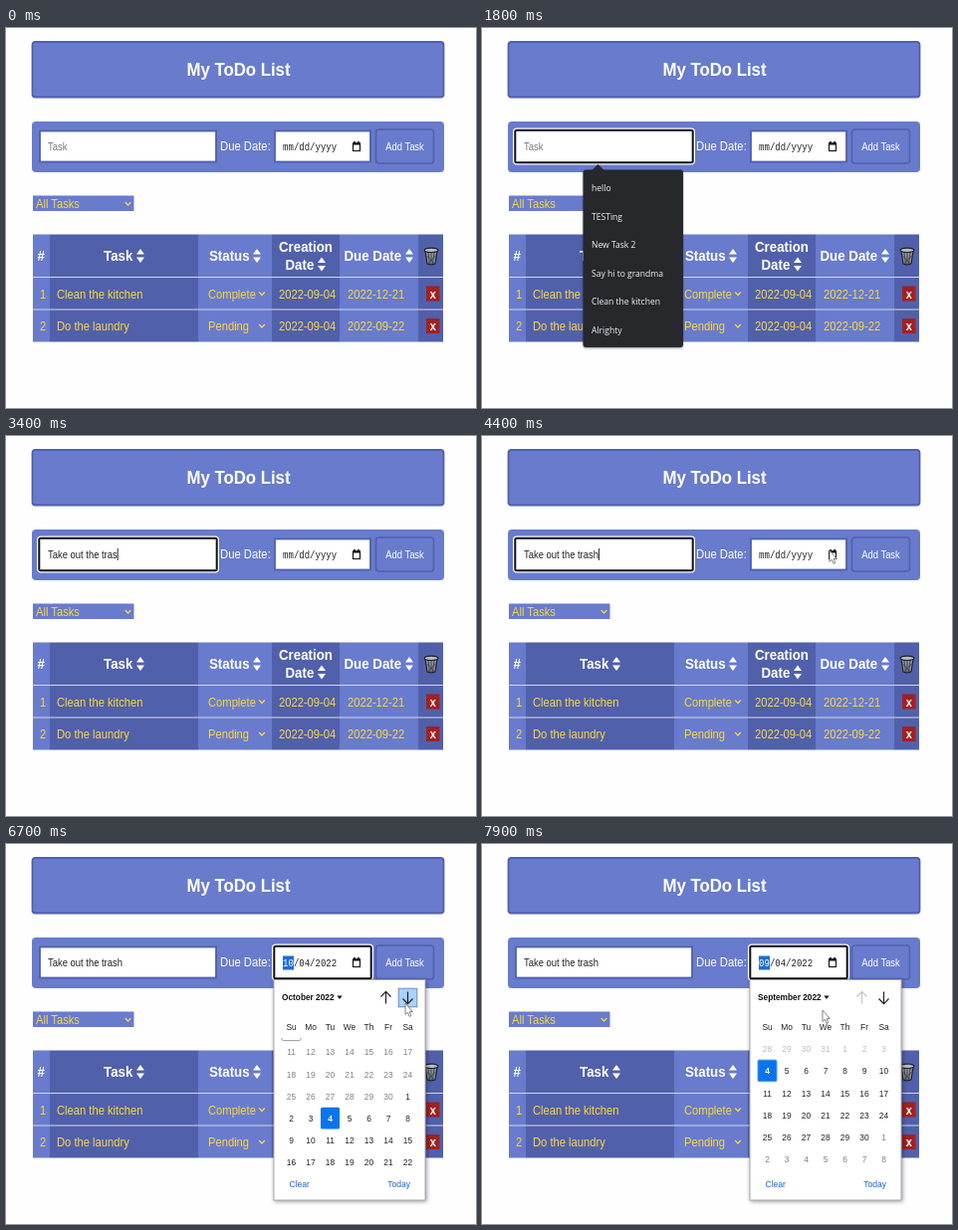
These frames come from a looping animation (472x382 px, 8 s). An HTML page:

```html
<!DOCTYPE html>
<html lang="en">
<head>
<meta charset="utf-8">
<title>My ToDo List</title>
<style>
  html, body { margin: 0; width: 100%; height: 100%; overflow: hidden; background: #fefdff; }
  svg { display: block; }
</style>
</head>
<body>
<svg id="stage" width="472" height="382" viewBox="0 0 472 382"></svg>
<script>
const LOOP = 8000, TICK = 100;
const SQUEEZE = 0.875;
const LIGHT = '#687bcd', DARK = '#5160ab', GOLD = '#fdd63c', INK = '#222', BLUE = '#0b74ec';
const SANS = '"Liberation Sans", Arial, sans-serif';
const MONO = '"Liberation Mono", monospace';
const UI = '"Open Sans", "Noto Sans", sans-serif';
const stage = document.getElementById('stage');

function el(parent, tag, attrs = {}) {
  const node = document.createElementNS('http://www.w3.org/2000/svg', tag);
  for (const key in attrs) node.setAttribute(key, attrs[key]);
  return parent.appendChild(node);
}
const group = (parent, attrs) => el(parent, 'g', attrs);
const rect = (parent, x, y, width, height, fill, more) =>
  el(parent, 'rect', { x, y, width, height, fill, ...more });
const path = (parent, d, stroke, more) =>
  el(parent, 'path', { d, stroke, fill: 'none', 'stroke-width': 1.2, ...more });

// y is the middle of the capitals
function text(parent, x, y, str, size, fill, more) {
  const node = el(parent, 'text', {
    transform: `translate(${x} ${y + size * 0.36}) scale(${SQUEEZE} 1)`,
    'font-size': size, 'font-family': SANS, fill, ...more
  });
  node.textContent = str;
  return node;
}
const bold = { 'font-weight': 700 };
const mid = { 'text-anchor': 'middle' };
const show = (node, on) => node.setAttribute('display', on ? 'inline' : 'none');

const sortIcon = (x, y) =>
  path(stage, `M${x - 4} ${y - 1.5}l4-5.5l4 5.5zM${x - 4} ${y + 1.5}l4 5.5l4-5.5z`, 'none', { fill: '#fff' });
const chevron = (x, y) => path(stage, `M${x - 2.8} ${y - 1.5}l2.8 3l2.8-3`, GOLD);

// Title and form
rect(stage, 0, 0, 472, 382, '#fefdff');
rect(stage, 26.5, 14, 413, 55.5, LIGHT, { rx: 3, stroke: DARK, 'stroke-width': 1.8 });
text(stage, 233.5, 41.5, 'My ToDo List', 19.2, '#fff', { ...bold, ...mid });
rect(stage, 26, 94, 414, 51, LIGHT, { rx: 4 });
text(stage, 215, 118.5, 'Due Date:', 12.9, '#fff');
rect(stage, 371.5, 102, 58, 34, LIGHT, { rx: 3, stroke: DARK, 'stroke-width': 1.6 });
text(stage, 400.5, 119, 'Add Task', 10.8, '#fff', mid);

function field(x, y, w, h) {
  rect(stage, x, y, w, h, '#fff', { stroke: DARK, 'stroke-width': 1.8 });
  const ring = rect(stage, x - 1, y - 1, w + 2, h + 2, '#fff', { rx: 2, stroke: '#fff', 'stroke-width': 4 });
  const inner = rect(stage, x - 0.7, y - 0.7, w + 1.4, h + 1.4, '#fff', { rx: 1.5, stroke: '#101014', 'stroke-width': 2 });
  return on => { show(ring, on); show(inner, on); };
}
const focusTask = field(34, 103.5, 177, 31);
const focusDate = field(270, 103.5, 96, 31);
const taskText = text(stage, 42, 119, '', 10.8, INK, { 'xml:space': 'preserve' });
const caret = rect(stage, 42, 113, 0.9, 12, '#111');
const monthMark = rect(stage, 278, 112.5, 11, 14, '#1b6fd2');
const monthText = text(stage, 278, 119.5, '', 10.3, INK, { 'font-family': MONO });
const restText = text(stage, 288.9, 119.5, '', 10.3, INK, { 'font-family': MONO });
rect(stage, 348.5, 116, 7, 7.5, '#fff', { stroke: '#111', 'stroke-width': 1.1 });
path(stage, 'M348 116.5h8M350 114v2M354 114v2', '#111', { 'stroke-width': 1.8 });

// Filter
rect(stage, 27, 168.5, 101.5, 15.5, LIGHT);
text(stage, 30, 176.5, 'All Tasks', 12.8, GOLD);
chevron(122.5, 176.5);

// Table
[27, 44, 193, 267, 335, 414, 439].forEach((x, i, edge) => {
  if (i < 6) rect(stage, x, 207.5, edge[i + 1] - x, 108, i % 2 ? DARK : LIGHT);
});
path(stage, 'M27 250.5h412M27 283h412', '#d3d6ec', { 'stroke-width': 1 });
const head = (x, y, str) => text(stage, x, y, str, 15.2, '#fff', bold);
head(31.5, 229, '#');
head(98, 229, 'Task');
head(204, 229, 'Status');
head(274, 220, 'Creation');
head(280.5, 237.5, 'Date');
head(339.5, 229, 'Due Date');
[[135, 229], [252, 229], [317, 237.5], [405, 229]].forEach(p => sortIcon(...p));

path(stage, 'M421 224l2 13q4 1.6 8 0l2-13z', '#20222a', { fill: '#8d929b' });
path(stage, 'M424 226l1.5 11M427 226v12M430 226l-1.5 11M422.5 229l8 8M431.5 229l-8 8', '#35383f', { 'stroke-width': 0.8 });
el(stage, 'ellipse', { cx: 427, cy: 223.3, rx: 6.8, ry: 2.2, fill: '#b9bdc4', stroke: '#20222a', 'stroke-width': 1.2 });

[
  ['1', 'Clean the kitchen', 'Complete', '2022-12-21'],
  ['2', 'Do the laundry', 'Pending', '2022-09-22']
].forEach(([num, task, status, due], i) => {
  const y = 267 + i * 32.5;
  const cell = (x, str) => text(stage, x, y, str, 12.8, GOLD);
  cell(34, num);
  cell(51, task);
  cell(203, status);
  cell(274, '2022-09-04');
  cell(343, due);
  chevron(257, y);
  rect(stage, 422, y - 7.5, 13.5, 15, '#a3201f');
  text(stage, 428.7, y + 0.2, 'x', 12.5, '#fff', { ...bold, ...mid });
});

// Suggestions
const hints = group(stage, { style: 'filter:drop-shadow(0 1px 1px #0006)' });
path(hints, 'M110 143.5l6.5-6.5l6.5 6.5z', 'none', { fill: '#26282c' });
rect(hints, 101.5, 142.5, 100.5, 178.5, '#26282c', { rx: 3 });
['hello', 'TESTing', 'New Task 2', 'Say hi to grandma', 'Clean the kitchen', 'Alrighty'].forEach((str, i) =>
  text(hints, 110, 160.5 + i * 28.6, str, 9.8, '#f1f1f3', { 'font-family': UI }));

// Date picker
const COL = 19.5, ROW = 22.2, X0 = 286.5, Y0 = 205.7;
const picker = group(stage);
rect(picker, 269, 136.5, 152, 221.5, '#fff', { stroke: '#a9a9ae', style: 'filter:drop-shadow(1px 1px 2px #0006)' });
const monthTitle = text(picker, 277, 154, '', 9.5, '#111', bold);
const titleTip = path(picker, 'M-2.6-1.5h5.2l-2.6 3.4z', 'none', { fill: '#111' });
function arrowButton(x, dir) {
  const g = group(picker, { transform: `translate(${x} 154.5) scale(1 ${dir})` });
  const back = rect(g, -9.3, -9.3, 18.6, 18.6, '#a8d2fa', { stroke: '#6b8fb5', 'stroke-width': 1 });
  const line = path(g, 'M0-6v12M-5 1l5 5.2l5-5.2', '#222', { 'stroke-width': 1.2 });
  return (hover, enabled) => {
    show(back, hover);
    line.setAttribute('stroke', enabled ? '#222' : '#c4c4c4');
  };
}
const setUp = arrowButton(381.5, -1), setDown = arrowButton(403.5, 1);
['Su', 'Mo', 'Tu', 'We', 'Th', 'Fr', 'Sa'].forEach((day, i) =>
  text(picker, X0 + i * COL, 183.5, day, 9.6, INK, mid));

const clip = el(el(stage, 'defs'), 'clipPath', { id: 'days' });
rect(clip, 270, 195, 150, 134, '#000');
const grid = group(group(picker, { 'clip-path': 'url(#days)' }));
const box = (x, y) => rect(grid, x - 9.5, y - 10.8, 19, 21.6, 'none', { rx: 1.5 });
const place = i => [X0 + (i % 7) * COL, Y0 + Math.floor(i / 7) * ROW];
const TODAY = 7, OCT_4 = 37;
const todayBox = box(...place(TODAY)), octBox = box(...place(OCT_4));
const days = Array.from({ length: 70 }, (_, i) => {
  const date = new Date(2022, 7, 28 + i);
  return { month: date.getMonth(), node: text(grid, ...place(i), date.getDate(), 9.6, INK, mid) };
});
text(picker, 284.5, 341.5, 'Clear', 9.8, '#1967d2');
text(picker, 406, 341.5, 'Today', 9.8, '#1967d2', { 'text-anchor': 'end' });

const pointer = path(stage, 'M0 0v11.5l2.4-2.3l1.7 4.2l1.8-.8l-1.7-4h3.2z', '#777', { fill: '#fff', 'stroke-width': 0.9 });

// Timeline
const FOCUS = 1000, HINTS = 1300, TYPE = 1900, KEY = 87, OPEN = 4700;
const NEXT = 6515, PREV = 7315, SLIDE = 400;
const PHRASE = 'Take out the trash';
const route = [ // time, x, y
  [0, -12, 190], [100, -4, 180], [900, 60, 119], [3600, 120, 119], [4300, 349, 115],
  [4700, 349, 115], [5300, 400, 207], [5600, 400, 207], [6200, 401, 160], [6950, 401, 160],
  [7200, 380, 156], [7500, 380, 156], [7900, 342, 167]
];
const clamp = v => Math.min(1, Math.max(0, v));
const ease = v => v * v * (3 - 2 * v);

function pointerAt(t) {
  const n = route.findIndex(p => p[0] > t);
  if (n < 0) return route[route.length - 1].slice(1);
  const a = route[n - 1], b = route[n], k = ease((t - a[0]) / (b[0] - a[0]));
  return [a[1] + (b[1] - a[1]) * k, a[2] + (b[2] - a[2]) * k];
}

function drawPicker(t, x, y) {
  const october = t >= NEXT && t < PREV, picked = t >= NEXT;
  const over = cx => Math.abs(x - cx) < 10 && Math.abs(y - 154.5) < 10;
  const slide = clamp((t - NEXT) / SLIDE) - clamp((t - PREV) / SLIDE);
  grid.setAttribute('transform', `translate(0 ${-slide * ROW * 4})`);
  monthTitle.textContent = october ? 'October 2022' : 'September 2022';
  titleTip.setAttribute('transform', `translate(${october ? 335 : 346} 154)`);
  setUp(october && over(381.5), october);
  setDown(over(403.5), true);

  const chosen = october ? OCT_4 : TODAY, month = october ? 9 : 8;
  todayBox.setAttribute('fill', october ? 'none' : BLUE);
  todayBox.setAttribute('stroke', october ? '#999' : picked ? '#4d9cf5' : '#111');
  todayBox.setAttribute('stroke-width', picked ? 1 : 1.6);
  octBox.setAttribute('fill', october ? BLUE : 'none');
  days.forEach((day, i) => {
    const fill = i === chosen ? '#fff' : i < TODAY ? '#bdbdbd' : day.month === month ? INK : '#808080';
    day.node.setAttribute('fill', fill);
    day.node.setAttribute('font-weight', i === chosen ? 700 : 400);
  });
}

function draw(t) {
  const count = Math.floor(clamp((t - TYPE) / KEY / PHRASE.length) * PHRASE.length + 1e-6);
  const inTask = t >= FOCUS && t < OPEN, open = t >= OPEN;
  focusTask(inTask);
  focusDate(open);
  taskText.textContent = count ? PHRASE.slice(0, count) : 'Task';
  taskText.setAttribute('fill', count ? INK : '#777');
  caret.setAttribute('x', 42 + (count ? taskText.getComputedTextLength() * SQUEEZE : 0));
  show(caret, inTask && t % 1000 < 500);
  show(hints, t >= HINTS && t < TYPE + KEY);

  monthText.textContent = t < NEXT ? 'mm' : t < PREV ? '10' : '09';
  restText.textContent = t < NEXT ? '/dd/yyyy' : '/04/2022';
  monthText.setAttribute('fill', open ? '#fff' : INK);
  show(monthMark, open);

  const [x, y] = pointerAt(t);
  show(picker, open);
  if (open) drawPicker(t, x, y);
  const overTask = x > 33 && x < 212 && y > 102 && y < 136;
  show(pointer, !overTask);
  pointer.setAttribute('transform', `translate(${x} ${y})`);
}

function frame() {
  draw(Math.floor(performance.now() % LOOP / TICK) * TICK);
  requestAnimationFrame(frame);
}
frame();
</script>
</body>
</html>
```
